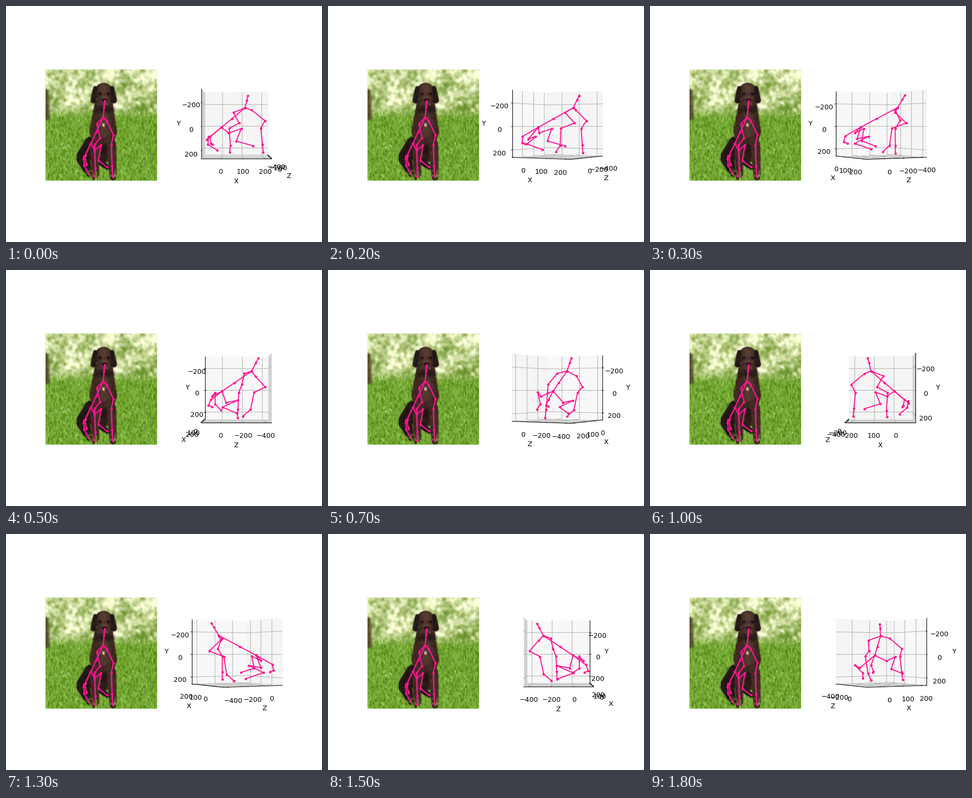
A matplotlib script for the animation above (2000 ms loop, 600 by 450 pixels).

```python
import numpy as np
import matplotlib.pyplot as plt
from matplotlib.animation import FuncAnimation

W, H, DPI = 600, 450, 93.75
FRAMES, INTERVAL = 20, 100
STEP_ANGLE = 30
PINK = "deeppink"
LEFT, TOP, SIDE = 75, 121.6, 211.4
COAT, DARK, LIGHT = (64, 42, 35), (38, 25, 22), (100, 70, 60)

CHAINS = [
    "nose throat withers back rump tail1 tail2 tail3",
    "withers lshoulder lelbow lwrist lankle lpaw",
    "withers rshoulder relbow rwrist rankle rpaw",
    "rump lhip lknee lhock lfoot",
    "rump rhip rknee rhock rfoot",
]

# Key joints relative to the centre of the 3D box: right, down, towards the viewer
POSE = dict(
    nose=(.20, -.48, -.36), withers=(.15, -.27, -.25), rump=(-.24, .06, .24),
    tail1=(-.42, .21, .44), tail2=(-.40, .31, .48), tail3=(-.38, .33, .42),
    lshoulder=(-.05, -.19, -.32), lelbow=(.05, -.01, -.48), lwrist=(-.12, .08, -.30),
    lankle=(-.10, .37, -.24), lpaw=(-.11, .48, -.11),
    rshoulder=(.26, -.23, -.13), relbow=(.48, -.05, -.09), rwrist=(.41, .08, -.04),
    rpaw=(.45, .48, -.02),
    lhip=(-.48, .26, .18), lknee=(-.46, .22, -.03), lhock=(-.46, .34, .24), lfoot=(-.32, .44, -.01),
    rhip=(-.12, .15, .41), rknee=(.08, .08, .35), rhock=(0, .28, .35), rfoot=(.27, .36, .25),
)
BOX = 1.1003
CENTER = np.array([70, -24, -139])
SPAN = np.array([320, 574, 628])


def between(a, b, share):
    return (1 - share) * POSE[a] + share * POSE[b]


POSE = {name: np.array(p) for name, p in POSE.items()}
POSE["throat"] = between("nose", "withers", .36)
POSE["back"] = between("withers", "rump", .57)
POSE["rankle"] = between("rwrist", "rpaw", .67)
FLAT = {name: p[:2] * (59.5, 150) + (175.5, 253) for name, p in POSE.items()}
SOLID = {name: CENTER + p / BOX * SPAN for name, p in POSE.items()}

rng = np.random.default_rng(4)
X, Y = np.meshgrid(LEFT + np.arange(211) + .5, TOP + np.arange(211) + .5)


def noise(sx, sy):
    """Blurred random field with unit deviation."""
    field = rng.normal(size=X.shape)
    for axis, sigma in ((1, sx), (0, sy)):
        t = np.arange(-int(3 * sigma), int(3 * sigma) + 1)
        kernel = np.exp(-t**2 / (2 * sigma**2))
        field = np.apply_along_axis(np.convolve, axis, field, kernel, "same")
    return field / field.std()


def mix(a, b, share):
    return a + (np.asarray(b) - a) * share[..., None]


def stroke(img, a, b, ra, rb, color, soft=1.5, alpha=1):
    """Tapered round brush stroke with a soft edge."""
    (ax, ay), (bx, by) = a, b
    dx, dy = bx - ax, by - ay
    t = np.clip(((X - ax) * dx + (Y - ay) * dy) / (dx**2 + dy**2 + 1e-9), 0, 1)
    gap = ra + (rb - ra) * t - np.hypot(X - ax - t * dx, Y - ay - t * dy)
    return mix(img, color, alpha * np.clip(gap / soft + .5, 0, 1))


def meadow(blades):
    """Sunlit leaves out of focus above a lawn."""
    leaves = .8 * noise(2.5, 2.5) + .6 * noise(8, 6)
    sky = np.clip((212 - Y) / 16, 0, 1)
    glow = np.clip((205 - Y) / 60, 0, 1)
    light = sky * (.42 + .2 * glow + .24 * leaves) + (1 - sky) * (.48 + .16 * blades)
    base = np.zeros(X.shape + (3,))
    shade = mix(base + (82, 135, 22), (112, 150, 48), sky)
    shine = mix(base + (150, 198, 82), (252, 255, 215), sky)
    img = mix(shade, shine, np.clip(light, 0, 1))
    img = stroke(img, (75, 165), (77, 212), 6, 6, (84, 70, 42), 5, .9)
    for x, y in zip(rng.uniform(78, 284, 25), rng.uniform(240, 330, 25)):
        img = stroke(img, (x, y), (x, y), .9, .9, (232, 240, 215))
    return img


def add_dog(img):
    j = FLAT
    img = stroke(img, j["rump"], j["lknee"], 13, 14, DARK)
    img = stroke(img, j["lhip"], j["lfoot"], 13, 6, DARK)
    img = stroke(img, (185, 192), (184, 238), 18, 26, COAT)
    img = stroke(img, (184, 238), (184, 286), 26, 13, COAT)
    img = stroke(img, (187, 205), (187, 240), 5, 8, LIGHT, 14, .7)
    img = stroke(img, (186, 268), (186, 290), 5, 7, DARK, 8)
    img = stroke(img, j["rhock"], j["rfoot"], 6, 5, DARK)
    for side in "lr":
        img = stroke(img, j[side + "wrist"], j[side + "paw"], 9, 7, COAT, 2)
        img = stroke(img, j[side + "wrist"], j[side + "paw"], 2, 1, LIGHT, 7, .5)
    img = stroke(img, (172, 198), (200, 198), 5, 5, DARK, 9, .8)

    img = stroke(img, (185, 164), (186, 182), 17, 12, COAT)
    img = stroke(img, (185, 156), (186, 160), 6, 6, LIGHT, 12, .9)
    for s in (-1, 1):
        img = stroke(img, (185 + s * 16, 157), (185 + s * 19, 180), 4, 6, DARK, 2)
        img = stroke(img, (186 + s * 8, 168), (186 + s * 9, 168), 2, 2, (20, 13, 12))
    img = stroke(img, (186, 177), (186, 187), 7, 7, LIGHT, 7, .8)
    img = stroke(img, (184, 180), (188, 180), 3, 3, (24, 16, 16), 2)
    img = stroke(img, (181, 192), (191, 192), 2, 2, DARK, 3)
    return stroke(img, (184.5, 226), (184.5, 228), 2.5, 2.5, (188, 178, 140))


def photograph():
    blades = noise(.7, 1.6)
    lawn = meadow(blades)
    tufts = np.clip((Y - 308) / 20, 0, 1) * np.clip(.5 + blades, 0, 1)
    img = mix(add_dog(lawn), lawn, tufts)
    img += 4 * blades[..., None]
    return np.clip(img, 0, 255).astype(np.uint8)


def draw_chains(ax, joints, width):
    for chain in CHAINS:
        coords = np.array([joints[name] for name in chain.split()]).T
        ax.plot(*coords, color=PINK, lw=width, marker=".", ms=5)


fig = plt.figure(figsize=(W / DPI, H / DPI), dpi=DPI, facecolor="white")

stage = fig.add_axes([0, 0, 1, 1])
stage.axis("off")
stage.imshow(photograph(), extent=(LEFT, LEFT + SIDE, TOP + SIDE, TOP),
             aspect="auto", interpolation="bilinear")
draw_chains(stage, FLAT, 1.8)
stage.set(xlim=(0, W), ylim=(H, 0))

space = fig.add_subplot(1, 2, 2, projection="3d")
space.set_box_aspect((1, 1, 1))
draw_chains(space, SOLID, 1.5)
low, high = CENTER - SPAN / 2, CENTER + SPAN / 2
space.set_xlim(low[0], high[0])
space.set_ylim(high[1], low[1])
space.set_zlim(low[2], high[2])
space.set_xticks([0, 100, 200])
space.set_yticks([-200, 0, 200])
space.set_zticks([-400, -200, 0])
space.set(xlabel="X", ylabel="Y", zlabel="Z")


def update(frame):
    angle = STEP_ANGLE * int((frame + .5) * .6)
    # A tiny tilt settles which panes count as hidden in edge-on views
    nudge = 1e-4 * (np.cos(np.radians(angle)) - np.sin(np.radians(angle)))
    space.view_init(elev=1e-4, azim=angle + nudge, vertical_axis="y")
    return []


anim = FuncAnimation(fig, update, frames=FRAMES, interval=INTERVAL,
                     init_func=lambda: update(0), repeat=True, repeat_delay=0)
plt.show()
```
